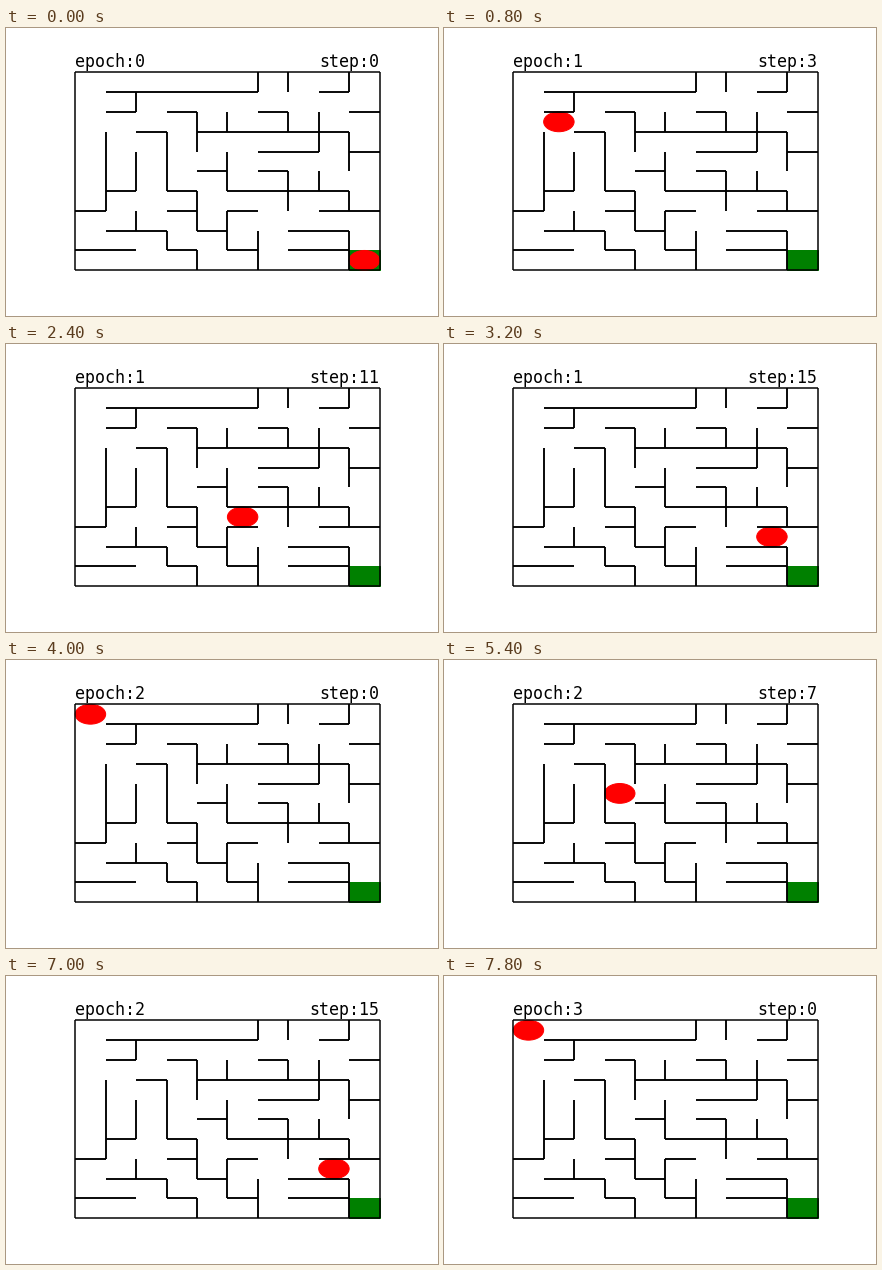
A matplotlib script for the animation above (8000 ms loop, 432x288 px).

```python
import matplotlib.pyplot as plt
from matplotlib.animation import FuncAnimation
from matplotlib.collections import LineCollection
from matplotlib.patches import Ellipse, Rectangle

WIDTH, HEIGHT, DPI = 432, 288, 72
FRAMES, INTERVAL = 40, 200
N = 10
X0, Y0 = 69.22, 44.35          # top left corner of the maze
CW, CH = 30.436, 19.79         # cell size
STEP = {"L": (-1, 0), "R": (1, 0), "U": (0, -1), "D": (0, 1)}

# Each wall grows from a grid corner along a string of unit moves.
WALLS = [
    # from the top edge
    (6, 0, "DLLLLL"), (2, 1, "DL"), (7, 0, "D"), (9, 0, "DL"),
    # from the right edge
    (10, 2, "L"), (10, 4, "L"), (9, 5, "UULLLLL"), (3, 2, "RDD"),
    (5, 2, "D"), (6, 2, "RD"), (8, 2, "DDLL"), (10, 7, "LL"),
    (9, 7, "ULLLL"), (5, 6, "UU"), (5, 5, "L"), (8, 5, "D"), (6, 5, "RDD"),
    # from the bottom edge
    (9, 10, "UULL"), (9, 9, "LL"), (6, 10, "UU"), (6, 9, "LUUR"),
    (5, 8, "LUULUUUL"), (4, 7, "L"), (4, 10, "ULULL"), (2, 8, "U"),
    # from the left edge
    (0, 9, "RR"), (0, 7, "RUUUU"), (1, 6, "RUU"),
]


def px(col):
    return X0 + CW * col


def py(row):
    return Y0 + CH * row


def edges(col, row, moves):
    """Unit edges along a wall, each as a sorted pair of corners."""
    for m in moves:
        dx, dy = STEP[m]
        nxt = (col + dx, row + dy)
        yield tuple(sorted([(col, row), nxt]))
        col, row = nxt


def border_between(a, b):
    """The unit edge shared by two neighbouring cells."""
    c, r = max(a[0], b[0]), max(a[1], b[1])
    return ((c, r), (c, r + 1)) if a[1] == b[1] else ((c, r), (c + 1, r))


def solve(walls):
    """Shortest way from the top left to the bottom right cell."""
    goal = (N - 1, N - 1)
    paths = [[(0, 0)]]
    seen = {(0, 0)}
    for path in paths:
        cell = path[-1]
        if cell == goal:
            return path
        for dx, dy in STEP.values():
            nxt = (cell[0] + dx, cell[1] + dy)
            inside = 0 <= nxt[0] < N and 0 <= nxt[1] < N
            if inside and nxt not in seen and border_between(cell, nxt) not in walls:
                seen.add(nxt)
                paths.append(path + [nxt])


inner = {e for wall in WALLS for e in edges(*wall)}
outer = set(edges(0, 0, "R" * N + "D" * N + "L" * N + "U" * N))
path = solve(inner)

fig = plt.figure(figsize=(WIDTH / DPI, HEIGHT / DPI), dpi=DPI, facecolor="white")
ax = fig.add_axes([0, 0, 1, 1])
ax.set_xlim(0, WIDTH)
ax.set_ylim(HEIGHT, 0)
ax.axis("off")

# An inner wall is drawn by both cells it parts.
lines = [[(px(c), py(r)) for c, r in e]
         for e in sorted(outer) + 2 * sorted(inner)]
ax.add_collection(LineCollection(lines, colors="black", linewidths=1.5))

ax.add_patch(Rectangle((px(N - 1), py(N - 1)), CW, CH, color="green"))
ball = ax.add_patch(Ellipse((0, 0), CW, CH, color="red"))

font = dict(family="DejaVu Sans Mono", fontsize=16.6, va="baseline")
epoch_label = ax.text(px(0), 39, "", ha="left", **font)
step_label = ax.text(px(N), 39, "", ha="right", **font)


def update(k):
    # The ball opens on the goal, then runs the path once per epoch.
    lap, step = divmod(k - 1, len(path))
    col, row = path[step]
    ball.set_center((px(col + 0.5), py(row + 0.5)))
    epoch_label.set_text(f"epoch:{lap + 1}")
    step_label.set_text(f"step:{step if k else 0}")
    return ball, epoch_label, step_label


anim = FuncAnimation(fig, update, frames=FRAMES, interval=INTERVAL,
                     repeat=True, repeat_delay=0, blit=False)
plt.show()
```
